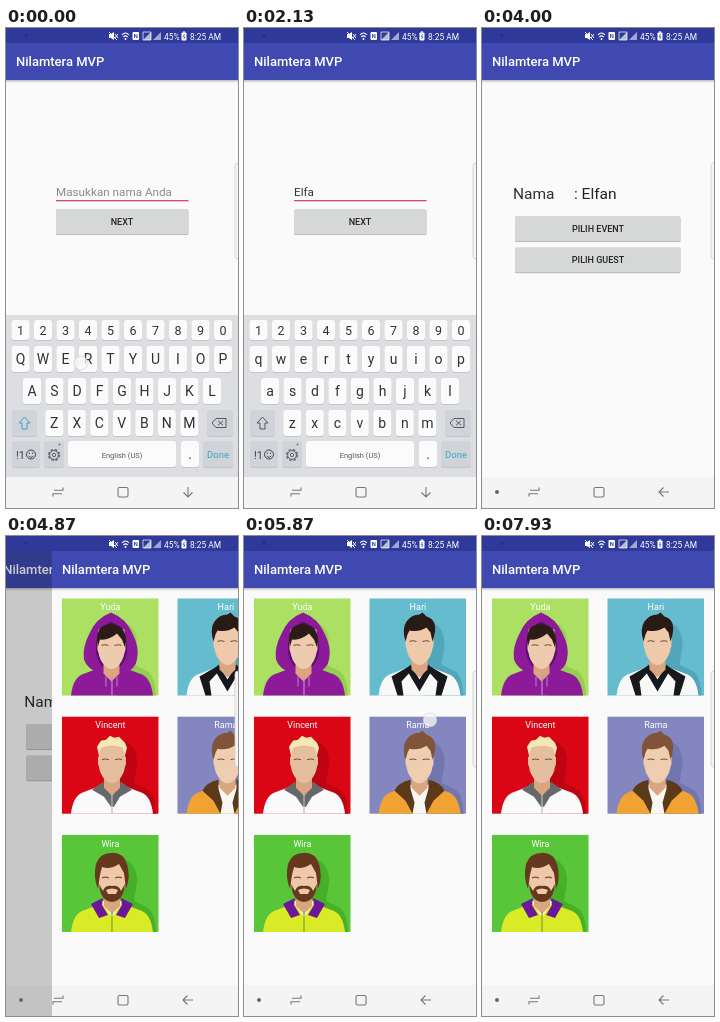
Animation, 232 px wide and 480 px high, one loop 8000 ms. Source, as an HTML page:

```html
<!DOCTYPE html>
<html lang="id">
<head>
<meta charset="utf-8">
<title>Nilamtera MVP</title>
<style>
html, body { margin: 0; width: 100%; height: 100%; overflow: hidden; background: #fafafa; }
svg { display: block; width: 100vw; height: 100vh; font-family: Roboto, sans-serif; }
.mid { text-anchor: middle; }
.med { font-weight: 500; }
</style>
</head>
<body>
<svg id="stage" viewBox="0 0 232 480"></svg>
<script>
const LOOP = 8000;
const NAME = 'Elfan';
const TITLE = 'Nilamtera MVP';

const rect = (x, y, w, h, fill, r = 0, extra = '') =>
  `<rect x="${x}" y="${y}" width="${w}" height="${h}" rx="${r}" fill="${fill}" ${extra}/>`;
const path = (d, fill, extra = '') => `<path d="${d}" fill="${fill}" ${extra}/>`;
const line = (d, color, w = 1) => path(d, 'none', `stroke="${color}" stroke-width="${w}"`);
const text = (x, y, size, fill, s, extra = '') =>
  `<text x="${x}" y="${y}" font-size="${size}" fill="${fill}" ${extra}>${s}</text>`;
const group = (id, body) => `<g id="${id}">${body}</g>`;
const shift = (x, y, body) => `<g transform="translate(${x} ${y})">${body}</g>`;

const button = (id, x, y, w, label) =>
  rect(x, y + 1, w, 25, '#b9b9b9', 1.5) + rect(x, y, w, 25, '#d6d7d7', 1.5, `id="${id}"`) +
  text(116, y + 16, 9, '#222', label, 'class="mid med"');

const screen = (id, body) => group(id,
  rect(0, 15, 232, 434, '#fafafa') + body + rect(0, 449, 232, 31, '#f4f4f4') +
  rect(0, 52, 232, 3, 'url(#shade)') + rect(0, 15, 232, 37, '#3f49b0') +
  text(10, 38, 13, '#fff', TITLE, 'class="med"') +
  rect(0, 15, 232, 465, '#000', 0, `id="${id}Dim" opacity="0"`));

// Avatars, each in a card about 97 px wide
const torso = 'M9 97Q11 80 20 76L41 68H59L80 76Q89 80 91 97Z';
const brows = line('M40 43Q43 41.5 47 43M53 43Q57 41.5 60 43', '#7d5138', 1.1);
const face = skin =>
  path('M42 55H58V71L50 79L42 71Z', '#d9a680') +
  path('M36 40H64V46Q64 50 62 50H38Q36 50 36 46Z', skin) +
  path('M37 27H63V50Q62 58 56 64Q50 69 44 64Q38 58 37 50Z', skin) + brows;
const shortHair = color =>
  path('M36 43Q32 30 37 23Q42 16 50 16L53 14L57 18Q68 21 65 36L63 43L61 34L57 29Q49 34 40 32L38 36Z', color);
const zip = color => line('M50 77V97', color, 1.2);

const people = [
  ['Yuda', '#abe062', '#96ce52',
    path(torso, '#8d1a98') +
    path('M49 14Q34 20 28 34Q20 49 22 61Q25 71 40 76L50 82L60 76Q74 71 75 61Q78 49 70 34Q64 20 49 14Z', '#8d1a98') +
    path('M49 23Q38 28 35 40Q31 56 39 66L49 78L60 66Q68 56 64 40Q61 28 49 23Z', '#5e0d70') +
    shift(-.5, 4, face('#eecbae')) +
    path('M36 48Q33 34 40 28Q48 23 58 28Q66 34 63 49L60 41L55 35Q47 42 38 41Z', '#2d1b18') +
    line('M44 78V88M55 78V88', '#cfa0d6', .8) + zip('#c58bcd')],
  ['Hari', '#66bccf', '#52a6ba',
    path(torso, '#f8f8f8') +
    path('M41 67L22 78L28 97H34L32 83L42 72Z', '#17181b') +
    path('M59 67L78 78L72 97H66L68 83L58 72Z', '#17181b') +
    path('M41 66L37 71L50 93L63 71L59 66L50 81Z', '#17181b') +
    face('#eecaab') + shortHair('#291a16')],
  ['Vincent', '#da0615', '#bd0410',
    path(torso, '#fafafa') + path('M41 65L30 73L42 80L49 90H52L58 80L70 73L59 65L50 79Z', '#66686b') +
    face('#e5bd9f') +
    path('M37 39L35 30L39 24L44 23L48 19L52 21L57 20L63 26L65 31L63 39L61 31Q50 27 39 31Z', '#f4e7b4') +
    zip('#b9bcc0')],
  ['Rama', '#8386bf', '#7276af',
    path(torso, '#f0a233') + path('M40 68H60L57 97H43Z', '#f9f7f2') +
    path('M41 63Q28 66 25 74L36 84L43 97L45 86L41 72Z', '#5b3919') +
    path('M59 63Q72 66 75 74L64 84L57 97L55 86L59 72Z', '#5b3919') +
    face('#efcdb0') + shortHair('#7f5438')],
  ['Wira', '#58c638', '#46b028',
    path(torso, '#d9ea26') + path('M39 66H61L50 82Z', '#fff') +
    path('M41 63L29 69L37 83L46 80L40 70Z', '#6d169a') + path('M59 63L71 69L63 83L54 80L60 70Z', '#6d169a') +
    face('#eec8a9') +
    path('M36 54Q31 42 34 29Q38 18 49 18Q61 17 65 29Q69 42 64 54L62 38L57 29Q48 35 40 32L38 40Z', '#66391e') +
    path('M37 49L41 56Q43 50 50 51Q57 50 59 56L63 49Q62 61 56 65Q50 69 44 65Q38 61 37 49Z', '#66391e') +
    path('M44 55Q50 52 56 55L54 59H46Z', '#eec8a9') + zip('#8b9b2a')]
];
const cards = people.map(([name, bg, shade, art], i) =>
  shift(i % 2 ? 125.5 : 10, 62.5 + 118.2 * (i >> 1),
    rect(0, 0, 96.5, 97, bg) + path('M55 22Q76 25 75 48L72 66L86 73Q93 78 94 97H55Z', shade) + art +
    text(48.4, 11.8, 9, '#fff', name, 'class="mid"'))).join('');

// Keyboard
const keys = {};
const rows = [['1234567890', 14.5, 292, 20], ['qwertyuiop', 14.5, 318, 26],
  ['asdfghjkl', 26, 350, 26], ['zxcvbnm', 48.3, 382, 26]];
let keyboard = rect(0, 287, 232, 162, '#dddee1');
for (const [chars, x0, y, h] of rows) {
  [...chars].forEach((c, i) => {
    const x = x0 + i * 22.5;
    keys[c] = { x, y };
    keyboard += rect(x - 9, y + 1, 18, h, '#c3c5c9', 3) + rect(x - 9, y, 18, h, '#fbfbfc', 3, `id="key-${c}"`) +
      text(x, y + h / 2 + 4.8, h < 26 ? 12.5 : 14, '#303336', c, `class="mid ${h < 26 ? '' : 'letter'}"`);
  });
}
keyboard += [[6, 382, 25, 1], [201, 382, 26, 1], [6, 413, 28, 1], [38, 413, 20, 1], [62, 413, 108], [175, 413, 18], [197, 413, 30, 1]]
  .map(([x, y, w, gray]) => rect(x, y + 1, w, 26, '#c3c5c9', 3) + rect(x, y, w, 26, gray ? '#d0d3d7' : '#fbfbfc', 3)).join('') +
  path('M18.5 389L13 395H16V401H21V395H24Z', 'none', 'id="shift" stroke-linejoin="round"') +
  line('M206 395L210 390.5H220V399.5H210ZM212 392.7L217 397.3M217 392.7L212 397.3', '#55595d') +
  text(10, 430.5, 11, '#404448', '!1') +
  `<circle cx="25" cy="426.5" r="4.5" fill="none" stroke="#404448"/>` +
  line('M22.8 428Q25 431 27.2 428M23.4 424.5V426M26.6 424.5V426', '#404448', .9) +
  `<circle cx="48" cy="427" r="5.4" fill="none" stroke="#606468" stroke-width="1.4" stroke-dasharray="2.6 1.64"/>` +
  `<circle cx="48" cy="427" r="4.4" fill="none" stroke="#606468"/><circle cx="48" cy="427" r="1.7" fill="none" stroke="#606468"/>` +
  `<circle cx="53.5" cy="416.5" r="1" fill="#777"/>` +
  text(116, 429.5, 7.5, '#55595d', 'English (US)', 'class="mid"') +
  text(184, 431, 14, '#303336', '.', 'class="mid"') +
  text(212, 430, 9.5, '#3aa6c4', 'Done', 'class="mid"') +
  group('popup', rect(-17.5, -53, 35, 45.5, '#b9bbbf', 6) + rect(-17.5, -54, 35, 45, '#fcfcfc', 6) +
    text(0, -21.5, 27, '#202224', '', 'class="mid" id="popupChar"'));

const statusBar = rect(0, 0, 232, 15, '#2f3999') +
  `<circle cx="20" cy="7.5" r="1.4" fill="#252e80"/>` +
  path('M103 6H105L108 4V12L105 10H103Z', '#fff') + line('M109 6L112 10M112 6L109 10M103 4L111 12', '#fff', .9) +
  line('M116 7Q119.5 3 123 7M117.4 9Q119.5 6.8 121.6 9', '#fff', 1.1) + `<circle cx="119.5" cy="11" r="1" fill="#fff"/>` +
  rect(126.5, 4, 6.5, 8, '#fff', 1) + line('M128.5 10V6L131 10V6', '#2f3999', .8) +
  path('M145 4V12H137Z', '#fff', 'fill-opacity=".65"') + line('M137 12V4H145V12Z', '#fff', .7) +
  path('M155 4V12H147Z', '#fff', 'fill-opacity=".55"') +
  text(158, 11.6, 8.4, '#fff', '45%') + rect(175.5, 4.5, 5, 8, '#fff', .8) + rect(176.9, 3.4, 2.2, 1.2, '#fff') +
  line('M178.5 6L177.1 8.8H179L177.8 11', '#2f3999', .7) + text(184, 11.6, 8.4, '#fff', '8:25 AM');

const nav =
  group('down', rect(0, 449, 232, 31, '#f4f4f4') + line('M182 459V469M177.5 464.5L182 469L186.5 464.5', '#777', 1.1)) +
  group('back', line('M187 464H177M181.5 459.5L177 464L181.5 468.5', '#777', 1.1) + '<circle cx="15" cy="464" r="2" fill="#666"/>') +
  line('M48 462.3H57V459.5M56 465.7H47V468.5', '#777', 1.1) +
  rect(112, 459.5, 10, 9.5, 'none', 1.5, 'stroke="#777" stroke-width="1.1"');

const stage = document.getElementById('stage');
stage.innerHTML =
  '<defs><linearGradient id="shade" x2="0" y2="1"><stop stop-opacity=".25"/><stop offset="1" stop-opacity="0"/></linearGradient></defs>' +
  rect(0, 0, 232, 480, '#fafafa') +
  screen('form', text(50, 167.5, 11.7, '#333', '', 'id="field"') + rect(50, 172, 132.5, 1.3, '#dc4172') +
    button('next', 50, 181, 132.5, 'NEXT')) +
  screen('menu', text(31, 170.5, 15.5, '#303030', 'Nama') + text(92, 170.5, 15.5, '#222', ': ' + NAME) +
    button('event', 33, 188, 165.5, 'PILIH EVENT') + button('guest', 33, 219.3, 165.5, 'PILIH GUEST')) +
  screen('grid', cards) +
  rect(229, 135, 8, 96, '#f5f5f5', 3, 'stroke="#cfcfcf" stroke-width=".8"') +
  group('keyboard', keyboard) + statusBar + nav +
  '<circle id="touch" fill="#f7f7f7" fill-opacity=".78" stroke="#aaa" stroke-opacity=".4" stroke-width=".8"/>';

const el = id => document.getElementById(id);
const letters = [...document.querySelectorAll('.letter')];

const presses = [['e', 70, 230], ['l', 560, 740], ['f', 1090, 1340], ['a', 1750, 1920], ['n', 2200, 2370]];
// from, to, x, y, radius
const touches = [[0, 230, 75, 335, 7], [560, 740, 207, 367, 7], [1090, 1400, 97, 370, 7.5], [1750, 1920, 28, 367, 7],
  [2200, 2370, 163, 399, 7], [2820, 3050, 120, 195, 8], [4380, 4540, 118, 233, 8], [5030, 5200, 118, 80, 12.5], [5740, 5960, 186, 184, 7]];

const clamp = v => Math.max(0, Math.min(1, v));
const easeOut = (t, start, length) => 1 - (1 - clamp((t - start) / length)) ** 3;
const during = (t, a, b) => t >= a && t < b;
const show = (id, on) => el(id).style.display = on ? '' : 'none';
const move = (id, x, y) => el(id).setAttribute('transform', `translate(${x} ${y})`);
const blend = (a, b, p) => `rgb(${a.map((v, i) => v + (b[i] - v) * p).join()})`;
const pressTone = (t, a, b) => blend([214, 215, 215], [196, 196, 196], clamp((t - a) / 100) * clamp((b - t) / 150));

// Screens enter from the right and drift left, darkening, when covered.
function place(id, entered, covered) {
  move(id, 232 * (1 - entered) - 16 * covered, 0);
  el(id + 'Dim').setAttribute('opacity', .25 * covered);
}

function render(t) {
  const typed = NAME.slice(0, presses.filter(p => t >= p[2]).length);
  const field = el('field');
  field.textContent = typed || 'Masukkan nama Anda';
  field.setAttribute('fill', typed ? '#333' : '#8b8b8b');

  const upper = !typed;
  letters.forEach(n => n.textContent = upper ? n.textContent.toUpperCase() : n.textContent.toLowerCase());
  el('shift').setAttribute('stroke', upper ? '#3aa6c4' : '#55595d');
  const press = presses.find(([, a, b]) => during(t, a, b));
  for (const [c] of presses) el('key-' + c).setAttribute('fill', press && press[0] === c ? '#b9bbbe' : '#fbfbfc');
  show('popup', press);
  if (press) {
    const { x, y } = keys[press[0]];
    move('popup', x, y);
    el('popupChar').textContent = upper ? press[0].toUpperCase() : press[0];
  }

  el('next').setAttribute('fill', pressTone(t, 2820, 3300));
  el('guest').setAttribute('fill', pressTone(t, 4380, 4720));
  const menuIn = easeOut(t, 3260, 480);
  const gridIn = easeOut(t, 4650, 530);
  place('form', 1, menuIn);
  place('menu', menuIn, gridIn);
  place('grid', gridIn, 0);
  show('form', t < 3760);
  show('menu', during(t, 3260, 5200));
  show('grid', t >= 4650);
  move('keyboard', 0, 170 * easeOut(t, 3220, 260));
  show('keyboard', t < 3480);
  show('down', t < 3480);
  show('back', t >= 3480);

  const touch = touches.find(([a, b]) => during(t, a, b));
  show('touch', touch);
  ['cx', 'cy', 'r'].forEach((k, i) => el('touch').setAttribute(k, touch ? touch[i + 2] : 0));
}

const begin = performance.now();
function tick() {
  render(Math.max(0, performance.now() - begin) % LOOP);
  requestAnimationFrame(tick);
}
tick();
</script>
</body>
</html>
```
